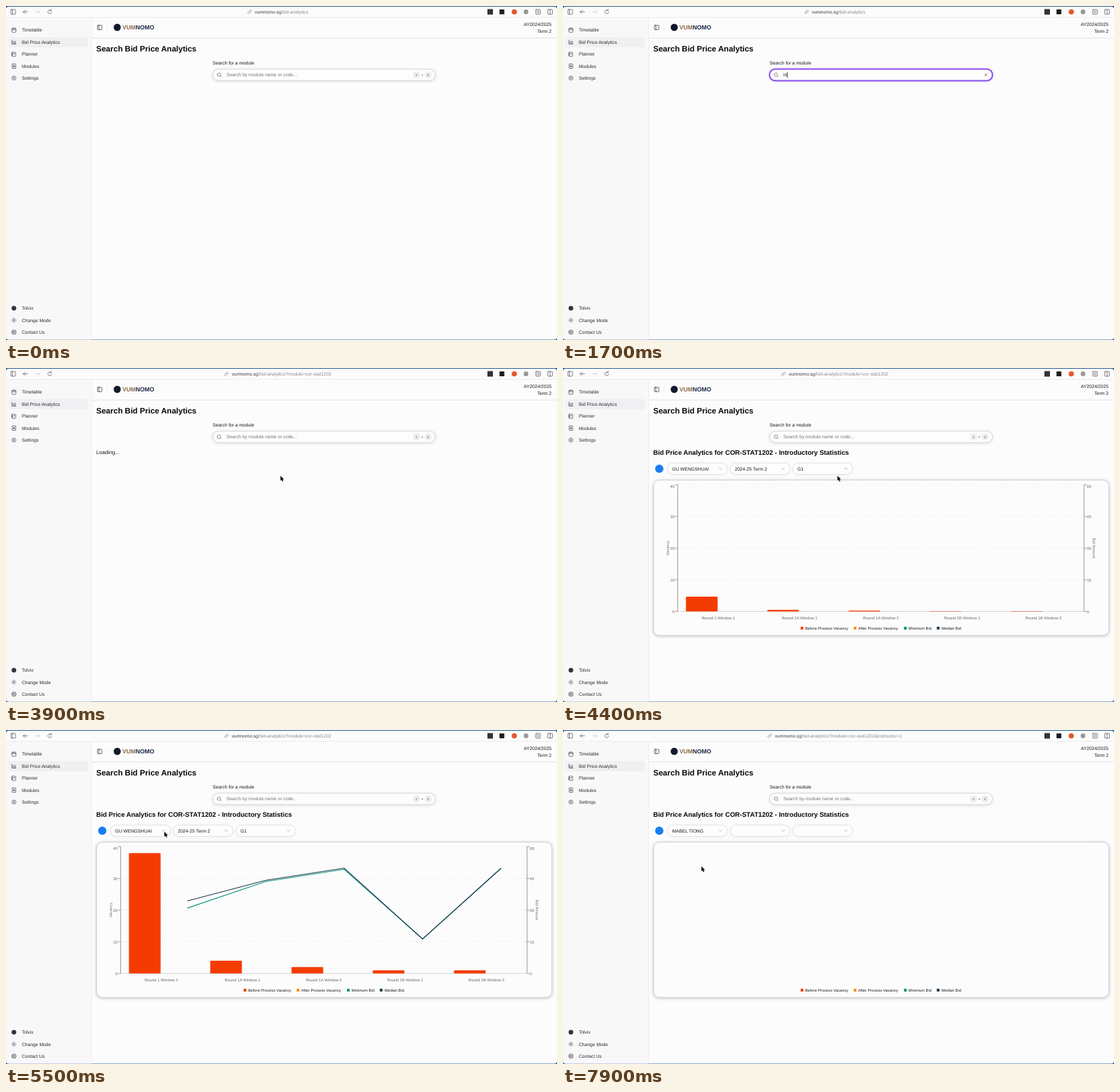
Write an HTML page with a canvas that moves like this. It is 800 by 485 pixels and loops after 8000 ms.

```html
<!DOCTYPE html>
<html lang="en">
<head>
<meta charset="utf-8">
<title>Bid Price Analytics</title>
<style>
  html, body { margin: 0; width: 100%; height: 100%; overflow: hidden; background: #fcfcfc; }
  canvas { display: block; width: 800px; height: 485px; }
</style>
</head>
<body>
<canvas id="stage"></canvas>
<script>
const LOOP = 8000, STEP = 100;
const SANS = '"Liberation Sans", Arial, sans-serif';
const MONO = '"DejaVu Sans Mono", monospace';
const INK = '#18181b', MUTED = '#737378', PAGE = '#fcfcfc', VIOLET = '#7c3aed';
const SITE = 'vumnomo.sg';
const PEOPLE = ['GU WENGSHUAI', 'MABEL TIONG'];

// Key moments in ms
const FOCUS = 700, TYPE = 1500, LIST = 2300, PICK = 3700, PANEL = 4100,
      DATA = 4353, MENU = 6700, SWITCH = 7300, ADDRESS = 7400;

const canvas = document.getElementById('stage');
const ctx = canvas.getContext('2d');
const dpr = window.devicePixelRatio || 1;
canvas.width = 800 * dpr;
canvas.height = 485 * dpr;

// Icons on a 24-unit grid
const ICONS = {
  calendar: 'M8 2v4M16 2v4M3 10h18M5 4h14a2 2 0 0 1 2 2v14a2 2 0 0 1-2 2H5a2 2 0 0 1-2-2V6a2 2 0 0 1 2-2z',
  chart: 'M3 3v16a2 2 0 0 0 2 2h16M7 16v-5l4-4 4 4 4-3v8z',
  planner: 'M13 2H6a2 2 0 0 0-2 2v16a2 2 0 0 0 2 2h12a2 2 0 0 0 2-2v-7M2 6h4M2 10h4M2 14h4M2 18h4M21 5.6l-3-3-5 5-1 4 4-1z',
  book: 'M5 2h15v20H5a1 1 0 0 1-1-1V3a1 1 0 0 1 1-1M8 16l4-9 4 9M9 13h6',
  gear: 'M12 2l3 3h4l1 4 2 3-2 3-1 4h-4l-3 3-3-3H5l-1-4-2-3 2-3 1-4h4zM9 12a3 3 0 1 0 6 0a3 3 0 1 0-6 0',
  sun: 'M8 12a4 4 0 1 0 8 0a4 4 0 1 0-8 0M12 2v2M12 20v2M2 12h2M20 12h2M5 5l1.4 1.4M17.6 17.6L19 19M5 19l1.4-1.4M17.6 6.4L19 5',
  help: 'M2 12a10 10 0 1 0 20 0a10 10 0 1 0-20 0M8 12a4 4 0 1 0 8 0a4 4 0 1 0-8 0M5 5l4 4M15 15l4 4M5 19l4-4M15 9l4-4',
  panel: 'M5 3h14a2 2 0 0 1 2 2v14a2 2 0 0 1-2 2H5a2 2 0 0 1-2-2V5a2 2 0 0 1 2-2zM9 3v18',
  split: 'M5 3h14a2 2 0 0 1 2 2v14a2 2 0 0 1-2 2H5a2 2 0 0 1-2-2V5a2 2 0 0 1 2-2zM12 3v18',
  note: 'M5 3h14a2 2 0 0 1 2 2v14a2 2 0 0 1-2 2H5a2 2 0 0 1-2-2V5a2 2 0 0 1 2-2zM8 9h8M8 15h8',
  search: 'M3 11a8 8 0 1 0 16 0a8 8 0 1 0-16 0M21 21l-4.3-4.3',
  close: 'M18 6L6 18M6 6l12 12',
  down: 'M6 9l6 6 6-6',
  back: 'M22 12H3M11 4l-8 8 8 8',
  next: 'M2 12h19M13 4l8 8-8 8',
  reload: 'M20 12a8 8 0 1 1-3-6.2M13 6h5V1',
  link: 'M10 13a5 5 0 0 0 7.5.5l3-3a5 5 0 0 0-7-7l-1.7 1.7M14 11a5 5 0 0 0-7.5-.5l-3 3a5 5 0 0 0 7 7l1.7-1.7'
};

function icon(name, x, y, size, color = '#333338', weight = 2) {
  const k = size / 24;
  ctx.save();
  ctx.translate(x - size / 2, y - size / 2);
  ctx.scale(k, k);
  ctx.strokeStyle = color;
  ctx.lineWidth = weight;
  ctx.lineCap = ctx.lineJoin = 'round';
  ctx.stroke(new Path2D(ICONS[name]));
  ctx.restore();
}

// y is the middle of the capitals
function text(s, x, y, size = 6.72, color = INK, opt = {}) {
  ctx.font = `${opt.bold ? 'bold ' : ''}${size}px ${opt.mono ? MONO : SANS}`;
  ctx.textAlign = opt.align || 'left';
  ctx.fillStyle = color;
  ctx.fillText(s, x, y + size * 0.36);
  return ctx.measureText(s).width;
}

function box(x, y, w, h, r, fill, stroke, lw = 1, shadow) {
  ctx.save();
  ctx.beginPath();
  ctx.roundRect(x, y, w, h, r);
  if (shadow) {
    ctx.shadowColor = shadow;
    ctx.shadowBlur = 5 * dpr;
    ctx.shadowOffsetY = dpr;
  }
  if (fill) { ctx.fillStyle = fill; ctx.fill(); }
  ctx.shadowColor = 'transparent';
  if (stroke) { ctx.strokeStyle = stroke; ctx.lineWidth = lw; ctx.stroke(); }
  ctx.restore();
}

function dot(x, y, r, fill, stroke) {
  ctx.beginPath();
  ctx.arc(x, y, r, 0, 7);
  ctx.fillStyle = fill;
  ctx.fill();
  if (stroke) { ctx.strokeStyle = stroke; ctx.lineWidth = 1; ctx.stroke(); }
}

function line(points, color, lw = 1, dash = []) {
  ctx.beginPath();
  points.forEach(p => ctx.lineTo(p[0], p[1]));
  ctx.setLineDash(dash);
  ctx.strokeStyle = color;
  ctx.lineWidth = lw;
  ctx.stroke();
  ctx.setLineDash([]);
}

const clamp = v => Math.max(0, Math.min(1, v));
const mix = (a, b, k) => a + (b - a) * k;

// cubic-bezier(.25, .1, .25, 1)
function ease(x) {
  x = clamp(x);
  let lo = 0, hi = 1;
  for (let i = 0; i < 20; i++) {
    const p = (lo + hi) / 2;
    if (0.75 * p * (1 - p) + p ** 3 < x) lo = p; else hi = p;
  }
  return 0.3 * lo * (1 - lo) ** 2 + 3 * lo * lo * (1 - lo) + lo ** 3;
}

function browserBar(t) {
  ctx.fillStyle = '#2c5f94';
  ctx.fillRect(0, 0, 800, 485);
  box(0, 1, 800, 483.5, 4, PAGE);
  line([[0, 16.5], [800, 16.5]], '#ececee');
  icon('panel', 10.5, 8.5, 9, '#555');
  icon('back', 28, 8.5, 8, '#444');
  icon('next', 46, 8.5, 8, '#c4c4c8');
  icon('reload', 63.5, 8.5, 8, '#444');

  let path = '/bid-analytics';
  if (t >= PICK) path += '?module=cor-stat1202';
  if (t >= ADDRESS) path += '&instructor=1';
  ctx.font = `6.72px ${SANS}`;
  const left = 400 - ctx.measureText(SITE + path).width / 2;
  icon('link', left - 7.5, 8.5, 7, '#777');
  const w = text(SITE, left, 8.5, 6.72, '#3c3c40');
  text(path, left + w, 8.5, 6.72, '#8a8a8f');

  box(699, 4.5, 8, 8, 0, '#333');
  box(716.5, 5, 7, 7, 0, '#1c1c1c');
  dot(738, 8.5, 3.8, '#e4572e');
  dot(755, 8.5, 3.4, '#98989c');
  icon('note', 772.5, 8.5, 9, '#555');
  icon('split', 790, 8.5, 9, '#555');
}

function frameUi() {
  ctx.fillStyle = '#f8f8f9';
  ctx.fillRect(0, 17, 124.5, 463);
  box(0, 470, 124.5, 14.5, [0, 0, 0, 4], '#f8f8f9');
  line([[124.5, 17], [124.5, 484]], '#efeff1');
  box(4, 45, 115, 15, 3, '#f0f0f2');
  const nav = [['calendar', 'Timetable', 35], ['chart', 'Bid Price Analytics', 52.5],
    ['planner', 'Planner', 70], ['book', 'Modules', 87.3], ['gear', 'Settings', 104.7],
    ['', 'Tolvix', 438.8], ['sun', 'Change Mode', 456.2], ['help', 'Contact Us', 473.6]];
  for (const [name, label, y] of nav) {
    if (name) icon(name, 11.5, y, 7.7); else dot(11.5, y, 3.4, '#333338');
    text(label, 23, y, 6.72, '#2b2b30');
  }

  line([[125, 46.5], [800, 46.5]], '#e4e4e7');
  icon('panel', 136, 31.2, 8.5);
  line([[146.5, 27], [146.5, 35]], '#ececee');
  dot(161.5, 31, 5.2, '#14192b');
  const w = text('VUM', 169, 31, 8.7, '#8a6a45', { bold: true });
  text('NOMO', 169 + w, 31, 8.7, '#1b2747', { bold: true });
  text('AY2024/2025', 792, 27, 6.72, INK, { align: 'right' });
  text('Term 2', 792, 36.3, 6.72, INK, { align: 'right' });
  text('Search Bid Price Analytics', 131, 62, 11.52, '#09090b', { bold: true });
  text('Search for a module', 300, 82.6);
}

function searchBox(t) {
  const focused = t >= FOCUS && t < PICK;
  const typed = t < PICK ? 'intro'.slice(0, clamp((t - TYPE + 150) / 750) * 5) : '';
  box(300, 91.8, 323.5, 16.4, 8.2, '#fdfdfd', '#d6d6da', 1, 'rgba(0,0,0,.14)');
  if (focused) box(299.7, 91.5, 324, 17, 8.5, null, '#8b4ff2', 2);
  icon('search', 309.5, 100, 7.5, '#55555a');
  let caret = 320;
  if (typed) {
    caret += text(typed, 320, 100) + 0.4;
    icon('close', 614, 100, 7.5, '#55555a');
  } else {
    text('Search by module name or code...', 320, 100, 6.72, MUTED);
    dot(596, 100, 5, '#ececef');
    dot(613, 100, 5, '#ececef');
    text('⌘', 596, 100, 4.4, '#66666b', { align: 'center', mono: true });
    text('+', 604.6, 100, 5.4, '#44444a', { align: 'center' });
    text('K', 613, 100, 4.8, '#66666b', { align: 'center' });
  }
  if (focused) line([[caret, 96], [caret, 104]], INK, 0.8);
}

const MODULES = [
  ['COR-STAT1202', 'Introductory Statistics',
    'The purpose of this course is to introduce the basic concepts of statistics through illustrative use of',
    'statistical methods for solving applied problems. Emphasis will be placed on statistical reasoning, rather…'],
  ['COR-STAT1203', 'Introduction to Statistical Theory',
    'This course is designed for students who have a background in basic probability and statistics and who',
    'intend to pursue a quantitative major in SMU. The course gives a mathematical introduction to statistical…'],
  ['COR2634', 'Introduction to Chinese History, Culture, Economy, Politics and Law',
    'With the rise of China as an economic superpower, foreign businesses have been rushing to do business in',
    'or with China. However, many businesses encounter various problems in China. This is mostly due to thei…']
];

function results(t) {
  box(300, 110.5, 324, 170.5, 6, '#fdfdfd', '#d0d0d4', 1, 'rgba(0,0,0,.28)');
  box(300.5, 111, 323, 15.5, [6, 6, 0, 0], '#f6f6f7');
  line([[300, 126.5], [624, 126.5]], '#e4e4e7');
  text('18 modules found (showing top 8)', 304, 118.6, 5.76, '#6b6b72');
  if (t >= 3200) box(300.5, 127, 316, 49.5, 0, '#f3f3f5');
  MODULES.forEach(([code, title, a, b], i) => {
    const y = i * 50.1;
    text(code, 310, 137.6 + y, 6.72, VIOLET, { bold: true, mono: true });
    text(title, 310, 149 + y);
    text(a, 310, 159.6 + y, 5.76, MUTED);
    text(b, 310, 167.6 + y, 5.76, MUTED);
    text('1 MCs', 591.5, 152 + y, 5.76, '#6b6b72');
    if (i < 2) line([[301, 177 + y], [616, 177 + y]], '#f1f1f3', 0.6);
  });
  box(616.5, 127, 7, 149, 0, '#f7f7f8', '#ececee', 0.5);
  box(618, 128, 4, 57, 2, '#bcbcc0');
}

const TOP = 169.5, BASE = 353.5, LEFT = 166.5, RIGHT = 756.5, GAP = 118;
const ROUNDS = ['Round 1 Window 1', 'Round 1A Window 1', 'Round 1A Window 2', 'Round 1B Window 1', 'Round 1B Window 2'];
const SEATS = [38, 4, 2, 1, 1];
const LOW = [30.96, 44, 50, 15.8, 50.5];
const MEDIAN = [34.44, 44.6, 50.6, 15.8, 50.5];
const SERIES = [['Before Process Vacancy', '#f43c02', 345], ['After Process Vacancy', '#f98b0a', 422],
  ['Minimum Bid', '#0d9280', 495], ['Median Bid', '#1d3a4d', 542.7]];
const midX = i => LEFT + GAP * (i + 0.5);
const bidY = v => mix(BASE, TOP, v / 60);

function select(x, label) {
  box(x, 138, 87, 16.5, 8.2, '#fdfdfd', '#e2e2e6', 1, 'rgba(0,0,0,.06)');
  text(label, x + 6.7, 146.2);
  icon('down', x + 77, 146.3, 7.5, '#8c8c91');
}

function tooltip(t) {
  const k = ease((t - 4710) / 400);
  const i = t < 4710 ? 1 : 0;
  const x = mix(353.5, 235.5, k), y = 190;
  box(x, y, 90, 49.5, 4, '#fefefe', '#dedee2', 0.7, 'rgba(0,0,0,.28)');
  text(ROUNDS[i], x + 6, y + 7.2, 5.76);
  const values = [SEATS[i], 0, LOW[i].toFixed(2), MEDIAN[i].toFixed(2)];
  SERIES.forEach(([name, color], n) => {
    const row = y + 16.6 + n * 8.7;
    box(x + 6, row - 2.4, 4.8, 4.8, 1, color);
    text(name, x + 14, row, 5.76, MUTED);
    text(values[n], x + 84, row, 5.76, INK, { mono: true, align: 'right' });
  });
}

function plot(t) {
  const grey = '#75757a';
  for (let i = 0; i < 5; i++) {
    const y = BASE - i * 46, ly = i === 4 ? 172.3 : y;
    line([[LEFT, y], [RIGHT, y]], '#e9e9ec', 0.7, [1.5, 1.5]);
    line([[LEFT - 3.5, y], [LEFT, y]], grey, 0.7);
    line([[RIGHT, y], [RIGHT + 3.5, y]], grey, 0.7);
    text(i * 10, 162, ly, 5.76, '#66666b', { align: 'right' });
    text(i * 15, 760.5, ly, 5.76, '#66666b');
    text(ROUNDS[i], midX(i), 363, 5.76, '#66666b', { align: 'center' });
  }
  line([[LEFT, TOP], [LEFT, BASE]], grey, 0.7);
  line([[RIGHT, TOP], [RIGHT, BASE]], grey, 0.7);
  line([[LEFT, BASE], [RIGHT, BASE]], '#c9c9cd', 0.7);
  for (const [s, x, turn] of [['Vacancy', 152.3, -1], ['Bid Amount', 771, 1]]) {
    ctx.save();
    ctx.translate(x, 261.5);
    ctx.rotate(turn * Math.PI / 2);
    text(s, 0, 0, 5.76, '#75757a', { align: 'center' });
    ctx.restore();
  }

  const hover = t >= 4560 && t < 5080;
  const hot = t < 4710 ? 1 : 0;
  if (hover) line([[midX(hot), TOP], [midX(hot), BASE]], '#cfcfd3');

  const grow = ease((t - DATA) / 400);
  SEATS.forEach((v, i) => {
    const h = v * 4.6 * grow;
    box(midX(i) - 47, BASE - h, 46, h, 1, SERIES[0][1]);
  });

  // Points fly in from far right at mid height
  const k = ease((t - DATA) / 1500);
  ctx.save();
  ctx.beginPath();
  ctx.rect(136, 164, 652, 222);
  ctx.clip();
  [[LOW, SERIES[2][1]], [MEDIAN, SERIES[3][1]]].forEach(([data, color]) => {
    const pts = data.map((v, i) => [mix(1312, midX(i), k), mix(260.5, bidY(v), k)]);
    line(pts, color, 1.1);
    if (k >= 1) pts.forEach(p => dot(p[0], p[1], 1.5, '#fff', color));
    if (hover) dot(midX(hot), bidY(data[hot]), 2, color);
  });
  ctx.restore();
  if (hover) tooltip(t);
}

function analytics(t) {
  const loaded = t >= DATA && t < SWITCH;
  text('Bid Price Analytics for COR-STAT1202 - Introductory Statistics', 131, 122.6, 9.58, '#09090b', { bold: true });
  dot(139.8, 146.2, 6, '#1a7df2');
  select(151.7, PEOPLE[t >= SWITCH ? 1 : 0]);
  select(242.7, loaded ? '2024-25 Term 2' : '');
  select(333.5, loaded ? 'G1' : '');
  box(131.5, 162.8, 661, 225.5, 8, '#fcfcfc', '#cfcfd3', 1, 'rgba(0,0,0,.25)');
  for (const [name, color, x] of SERIES) {
    box(x, 375.8, 4, 4, 0.5, color);
    text(name, x + 6.7, 377.9, 5.76, '#222226');
  }
  if (loaded) plot(t);
  else for (const y of [TOP, BASE]) line([[LEFT, y], [765, y]], '#eeeef0', 0.7, [1.5, 1.5]);

  if (t >= MENU && t < SWITCH) {
    box(151.7, 156.5, 87, 53, 4, '#fefefe', '#e0e0e4', 0.8, 'rgba(0,0,0,.18)');
    icon('search', 160, 165.5, 6, '#99999e');
    line([[152, 174.5], [238.5, 174.5]], '#e8e8eb', 0.8);
    box(154, t >= 7000 ? 192 : 176.5, 82.5, 15, 3, '#f1f1f3');
    PEOPLE.forEach((name, i) => text(name, 163, 184 + i * 15.5));
  }
}

// [time, x, y] of the pointer tip
const TRAIL = [[200, 420, 160], [600, 392, 100], [2800, 392, 100], [3200, 398.5, 156.5], [4400, 398.5, 156.5],
  [4650, 300, 178], [4900, 261, 168], [5300, 231, 148], [6500, 227.3, 147], [6800, 227.3, 147], [7100, 201, 198], [8000, 201, 198]];

function pointer(t) {
  if (t < 200 || (t >= 1300 && t < 2800)) return;
  const n = TRAIL.findIndex(p => p[0] > t);
  const a = TRAIL[n - 1], b = TRAIL[n];
  let k = (t - a[0]) / (b[0] - a[0]);
  k = k * (2 - k);
  const x = mix(a[1], b[1], k), y = mix(a[2], b[2], k);
  ctx.save();
  ctx.translate(x, y);
  if (y > 91 && y < 109) {
    const beam = new Path2D('M-1.6 -3.8Q0 -3.8 0 -2.8V2.8Q0 3.8 -1.6 3.8M1.6 -3.8Q0 -3.8 0 -2.8M0 2.8Q0 3.8 1.6 3.8M-1 .8H1');
    ctx.strokeStyle = '#111';
    ctx.lineWidth = 0.9;
    ctx.stroke(beam);
  } else {
    const arrow = new Path2D('M0 0V7.2L1.7 5.7 2.9 8.4 4.2 7.8 3 5.2H5.2Z');
    ctx.strokeStyle = '#fff';
    ctx.lineWidth = 1.2;
    ctx.stroke(arrow);
    ctx.fillStyle = '#000';
    ctx.fill(arrow);
  }
  ctx.restore();
}

function draw(t) {
  ctx.setTransform(dpr, 0, 0, dpr, 0, 0);
  ctx.textRendering = 'geometricPrecision';
  browserBar(t);
  frameUi();
  searchBox(t);
  if (t >= LIST && t < PICK) results(t);
  if (t >= PICK && t < PANEL) text('Loading...', 131, 121.8, 7.68);
  if (t >= PANEL) analytics(t);
  pointer(t);
}

const start = performance.now();
function tick(now) {
  const t = Math.max(0, now - start) % LOOP;
  draw(Math.floor(t / STEP) * STEP);
  requestAnimationFrame(tick);
}
draw(0);
requestAnimationFrame(tick);
</script>
</body>
</html>
```
